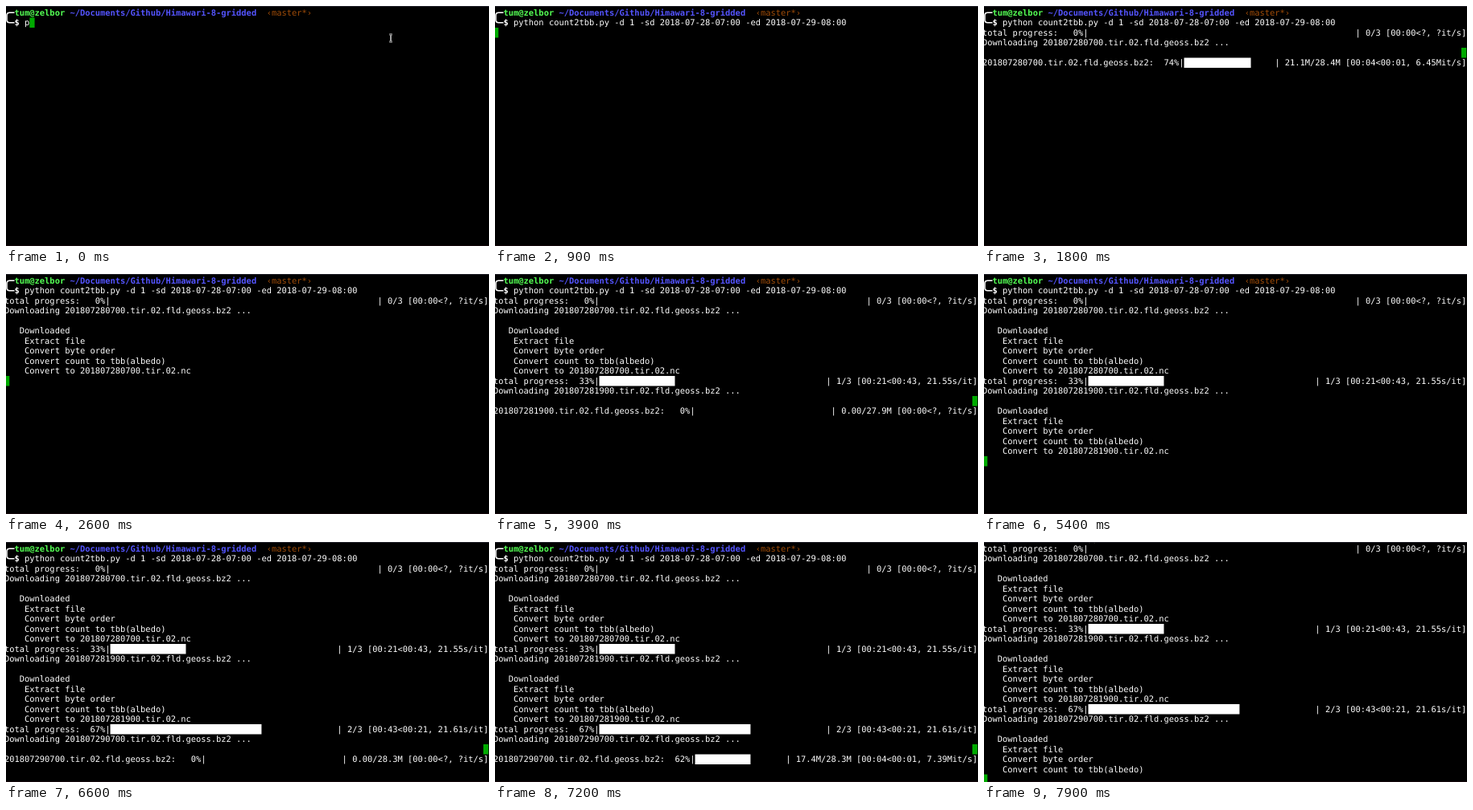
Write an HTML page with a canvas that moves like this. It is 600 by 299 pixels and loops after 8000 ms.

```html
<!DOCTYPE html>
<html lang="en">
<head>
<meta charset="utf-8">
<title>Terminal session</title>
<style>
  html, body { margin: 0; width: 100%; height: 100%; overflow: hidden; background: #000; }
  canvas { display: block; }
</style>
</head>
<body>
<canvas id="stage" width="600" height="299"></canvas>
<script>
const ctx = document.getElementById('stage').getContext('2d');
const LOOP = 8000, TICK = 100;
const COLS = 96, ROWS = 24;
const CELL_W = 6.263, CELL_H = 12.5, LEFT = -2, TOP = 2;
const FONT = '10.4px "DejaVu Sans Mono", monospace';
const WHITE = '#fff', GREEN = '#54ff54', BLUE = '#5454ff', BROWN = '#a04c08', CURSOR = '#00aa00';

const COMMAND = 'python count2tbb.py -d 1 -sd 2018-07-28-07:00 -ed 2018-07-29-08:00';
const TYPED = [1, 14, 27, 40, 40, 47, 54, 60, 66];
const ENTER = 900, POINTER_HIDES = 500;

// done and rate are the values reached six ticks into a download; stages are the times of the log lines
const jobs = [
  { start: 1200, file: '201807280700.tir.02', timing: '00:00<?, ?it/s',
    total: 28.4, done: 21.1, rate: 6.45, power: 1.03, pace: 0.75,
    stages: [2100, 2100, 2300, 2400, 2600] },
  { start: 3900, file: '201807281900.tir.02', timing: '00:21<00:43, 21.55s/it',
    total: 27.9, done: 23.7, rate: 3.38, power: 0.55, pace: 0.85,
    stages: [4800, 4800, 5100, 5100, 5300] },
  { start: 6600, file: '201807290700.tir.02', timing: '00:43<00:21, 21.61s/it',
    total: 28.3, done: 17.44, rate: 7.39, power: 1.5, pace: 0.75,
    stages: [7500, 7500, 7900, 7900, Infinity] }
];

const colX = col => LEFT + col * CELL_W;
const rowY = row => TOP + row * CELL_H;
const clock = seconds => '00:' + String(Math.floor(seconds)).padStart(2, '0');

function drawText(text, col, row, color = WHITE, bold = false) {
  ctx.font = (bold ? 'bold ' : '') + FONT;
  ctx.fillStyle = color;
  [...text].forEach((char, i) => {
    if (char !== ' ') ctx.fillText(char, colX(col + i), Math.round(rowY(row) + 9.65));
  });
}

function fillCells(col, row, width, color) {
  ctx.fillStyle = color;
  ctx.fillRect(colX(col), rowY(row), width * CELL_W, CELL_H);
}

function drawBar({ label, fraction, stats }, row) {
  const left = label + ': ' + String(Math.round(fraction * 100)).padStart(3) + '%|';
  const right = '| ' + stats;
  const width = COLS - left.length - right.length;
  drawText(left, 0, row);
  fillCells(left.length, row, Math.floor(fraction * width * 8 + 1e-6) / 8, WHITE);
  drawText(right, COLS - right.length, row);
}

function downloadBar(job, t) {
  const ticks = (t - job.start) / TICK;
  const label = job.file + '.fld.geoss.bz2';
  if (ticks === 0) {
    return { label, fraction: 0, stats: `0.00/${job.total}M [00:00<?, ?it/s]` };
  }
  const done = Math.min(job.total, job.done * (ticks / 6) ** job.power);
  const rate = job.rate * (ticks / 6) ** (job.power - 1);
  const times = clock(ticks * job.pace) + '<' + clock((job.total - done) / rate);
  return {
    label,
    fraction: done / job.total,
    stats: `${done.toPrecision(3)}M/${job.total}M [${times}, ${rate.toPrecision(3)}Mit/s]`
  };
}

// Log lines and cursor below the command line
function sessionAt(t) {
  const lines = [];
  let cursor = null;
  jobs.forEach((job, i) => {
    if (t < job.start) return;
    lines.push({ label: 'total progress', fraction: i / 3, stats: `${i}/3 [${job.timing}]` });
    lines.push(`Downloading ${job.file}.fld.geoss.bz2 ...`, '');
    if (t < job.stages[0]) {
      cursor = { col: COLS - 1, row: lines.length + 1 };
      lines.push(downloadBar(job, t));
      return;
    }
    const log = ['   Downloaded', '    Extract file', '    Convert byte order',
      '    Convert count to tbb(albedo)', `    Convert to ${job.file}.nc`];
    lines.push(...log.filter((_, k) => t >= job.stages[k]));
  });
  return { lines, cursor: cursor || { col: 0, row: lines.length + 2 } };
}

function drawPrompt(scroll, typed) {
  const top = rowY(-scroll) + CELL_H / 2, bottom = top + CELL_H;
  ctx.strokeStyle = WHITE;
  ctx.lineWidth = 1.6;
  ctx.beginPath();
  ctx.moveTo(10.5, top);
  ctx.lineTo(4.5, top);
  ctx.quadraticCurveTo(1, top, 1, top + 3.5);
  ctx.lineTo(1, bottom - 3.5);
  ctx.quadraticCurveTo(1, bottom, 4.5, bottom);
  ctx.lineTo(10.5, bottom);
  ctx.stroke();
  drawText('tum@zelbor', 2, -scroll, GREEN, true);
  drawText('~/Documents/Github/Himawari-8-gridded', 13, -scroll, BLUE, true);
  drawText('‹master*›', 52, -scroll, BROWN);
  drawText('$', 2, 1 - scroll, WHITE, true);
  drawText(COMMAND.slice(0, typed), 4, 1 - scroll);
}

function drawPointer() {
  const stroke = (color, width) => {
    ctx.strokeStyle = color;
    ctx.lineWidth = width;
    ctx.stroke();
  };
  ctx.beginPath();
  for (const y of [35.6, 44.6]) {
    ctx.moveTo(476.2, y);
    ctx.lineTo(479.8, y);
  }
  ctx.moveTo(478, 35.6);
  ctx.lineTo(478, 44.6);
  stroke('#ddd', 2);
  stroke('#111', 0.6);
}

function draw(t) {
  ctx.fillStyle = '#000';
  ctx.fillRect(0, 0, 600, 299);
  ctx.fillStyle = '#14060a';
  ctx.fillRect(0, 298, 600, 1);

  const typed = t < ENTER ? TYPED[t / TICK] : COMMAND.length;
  const session = sessionAt(t);
  const cursor = t < ENTER ? { col: 4 + typed, row: 1 } : session.cursor;
  const scroll = Math.max(0, cursor.row - ROWS + 1);

  drawPrompt(scroll, typed);
  session.lines.forEach((line, i) => {
    const row = i + 2 - scroll;
    if (typeof line === 'string') drawText(line, 0, row);
    else drawBar(line, row);
  });
  fillCells(cursor.col, cursor.row - scroll, 1, CURSOR);
  if (t < POINTER_HIDES) drawPointer();

  ctx.fillStyle = '#24242c';
  ctx.fillRect(0, 0, 600, 1);
}

ctx.textBaseline = 'alphabetic';
ctx.textRendering = 'geometricPrecision';
const began = performance.now();
function frame() {
  const t = Math.max(0, performance.now() - began) % LOOP;
  draw(Math.floor(t / TICK) * TICK);
  requestAnimationFrame(frame);
}
frame();
</script>
</body>
</html>
```
